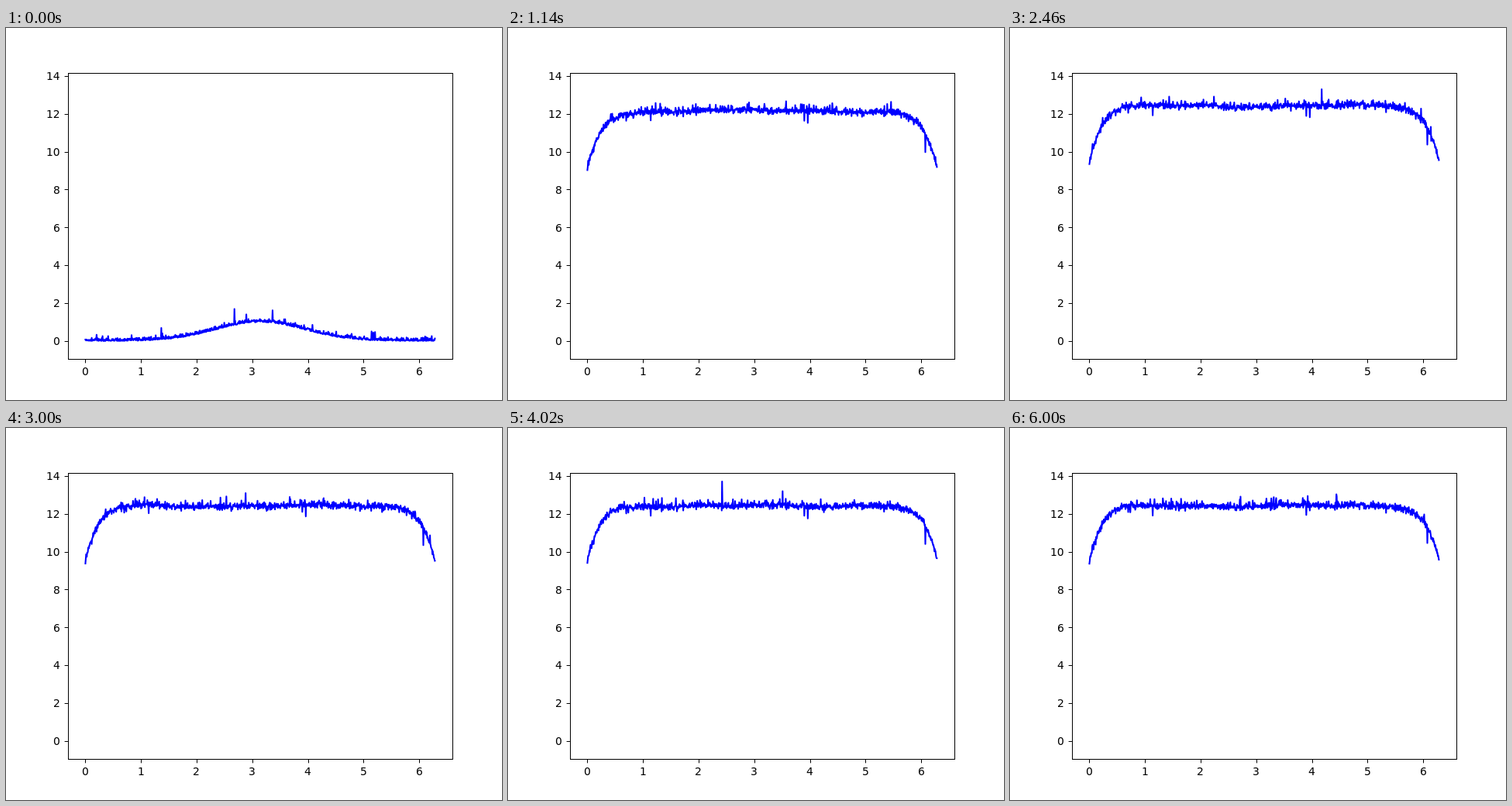
These frames come from a looping animation (640x480 px, 6.06 s). An HTML page:

```html
<!DOCTYPE html>
<html lang="en">
<head>
<meta charset="utf-8">
<title>Noisy growth curve</title>
<style>
  html, body { margin: 0; width: 100%; height: 100%; overflow: hidden; background: #fff; }
  svg { display: block; width: 640px; height: 480px; }
  text { font: 13.889px "DejaVu Sans", sans-serif; fill: #000; }
  .axis { fill: none; stroke: #000; stroke-width: 1; }
  .curve { fill: none; stroke: #00f; stroke-width: 2.083; stroke-linejoin: round; stroke-linecap: square; }
</style>
</head>
<body>
<svg viewBox="0 0 640 480">
  <polyline class="curve" id="curve"/>
  <g id="axes"><rect class="axis" x="80.5" y="58.5" width="496" height="369"/></g>
</svg>
<script>
const STEP_MS = 60, STEPS = 101, COUNT = 1000, DECAY = 0.81;
const X_MAX = 2 * Math.PI, DIGIT_WIDTH = 9;
const px = x => 102.45 + x * 71.77;
const py = y => 403.95 - y * 24.435;

let seed = 20;
function random() {
  seed = (seed + 0x6D2B79F5) | 0;
  let t = Math.imul(seed ^ (seed >>> 15), 1 | seed);
  t ^= t + Math.imul(t ^ (t >>> 7), 61 | t);
  return ((t ^ (t >>> 14)) >>> 0) / 4294967296;
}
const exponential = mean => -mean * Math.log(1 - random());
const normal = sd => sd * Math.sqrt(exponential(2)) * Math.cos(X_MAX * random());
const rare = (chance, mean) => random() < chance ? exponential(mean) : 0;

// A central bump fades while growth spreads outwards to a plateau with soft ends.
function level(x, step) {
  const edge = Math.min(x, X_MAX - x);
  const offset = Math.abs(x - Math.PI);
  const plateau = 12.41 - 2.9 * Math.exp(-4.2 * edge - 1.5 * edge * edge);
  const delay = 0.7 + 3.1 * (offset / Math.PI) ** 3;
  const bump = Math.exp(-offset * offset / 1.25) * DECAY ** step;
  return bump + plateau * (1 - DECAY ** Math.max(0, step - delay));
}

const drift = (x, step) =>
  0.04 * Math.sin(1.9 * x + step * 0.13) +
  0.03 * Math.sin(4.3 * x - step * 0.21 + 1);

function buildCurves() {
  const xs = Array.from({ length: COUNT }, (_, i) => i / (COUNT - 1) * X_MAX);
  const grain = xs.map(() => normal(0.08) - rare(0.025, 0.2));
  let bursts = xs.map(() => Math.abs(normal(0.08)) + rare(0.06, 0.15));
  const curves = [];
  for (let step = 0; step < STEPS; step++) {
    const grown = 1 - DECAY ** step;
    curves.push(xs.map((x, i) => {
      const noise = grown * (grain[i] + drift(x, step) + normal(0.035));
      const y = level(x, step) + bursts[i] + noise;
      return px(x).toFixed(2) + "," + py(y).toFixed(2);
    }).join(" "));
    bursts = bursts.map(height => height * DECAY + rare(0.04, 0.13));
  }
  return curves;
}

const axes = document.getElementById("axes");
function add(tag, attributes, content = "") {
  const node = document.createElementNS(axes.namespaceURI, tag);
  for (const key in attributes) node.setAttribute(key, attributes[key]);
  node.textContent = content;
  axes.append(node);
}
for (let value = 0; value <= 6; value++) {
  const x = px(value);
  add("path", { class: "axis", d: `M${Math.round(x) + 0.5} 427.5v4.86` });
  add("text", { x: Math.round(x - DIGIT_WIDTH / 2), y: 448 }, value);
}
for (let value = 0; value <= 14; value += 2) {
  const y = py(value);
  add("path", { class: "axis", d: `M80.5 ${Math.round(y) + 0.5}h-4.86` });
  add("text", { x: 70 - DIGIT_WIDTH * String(value).length, y: Math.round(y + 5.28) }, value);
}

const curve = document.getElementById("curve");
const curves = buildCurves();
const start = performance.now();
let shown = -1;
function draw() {
  const step = Math.floor((performance.now() - start) / STEP_MS) % STEPS;
  if (step !== shown) {
    curve.setAttribute("points", curves[step]);
    shown = step;
  }
  requestAnimationFrame(draw);
}
draw();
</script>
</body>
</html>
```
